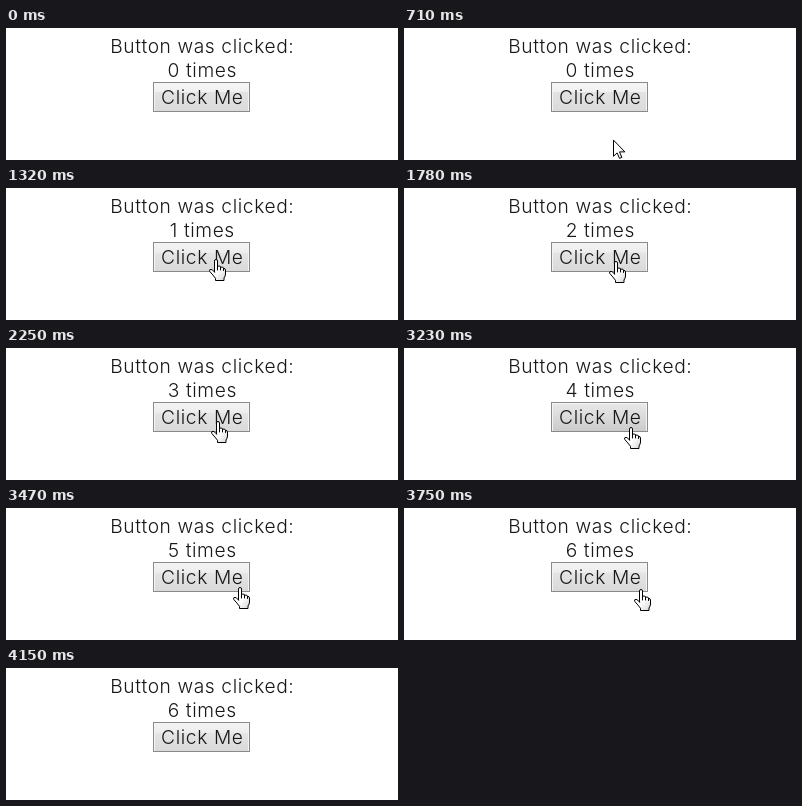
An HTML page that plays this animation: 392x132 px, repeating every 4580 ms.

```html
<!DOCTYPE html>
<html lang="en">
<head>
<meta charset="utf-8">
<title>Click counter</title>
<style>
  html, body { margin: 0; width: 100%; height: 100%; overflow: hidden; background: #fff; }
  svg { display: block; }
  text {
    font: 300 19.2px Inter, "Open Sans", sans-serif;
    letter-spacing: .6px;
    text-anchor: middle;
    fill: #181818;
  }
  .cursor { fill: url(#shade); stroke: #000; stroke-linejoin: round; stroke-linecap: round; }
</style>
</head>
<body>
<svg width="392" height="132" viewBox="0 0 392 132">
  <defs>
    <linearGradient id="normal" x2="0" y2="1">
      <stop offset="0" stop-color="#f6f6f6"/>
      <stop offset=".3" stop-color="#f0f0f0"/>
      <stop offset=".3" stop-color="#e3e3e3"/>
      <stop offset="1" stop-color="#dadada"/>
    </linearGradient>
    <linearGradient id="hover" x2="0" y2="1">
      <stop offset="0" stop-color="#f3f3f3"/>
      <stop offset=".3" stop-color="#ededed"/>
      <stop offset=".35" stop-color="#e4e4e4"/>
      <stop offset="1" stop-color="#d9d9d9"/>
    </linearGradient>
    <linearGradient id="pressed" x2="0" y2="1">
      <stop offset="0" stop-color="#e8e8e8"/>
      <stop offset="1" stop-color="#cbcbcb"/>
    </linearGradient>
    <linearGradient id="shade" x2="1" y2="1">
      <stop offset=".55" stop-color="#fff"/>
      <stop offset="1" stop-color="#d4d4d4"/>
    </linearGradient>
  </defs>
  <text x="196.3" y="25">Button was clicked:</text>
  <text id="count" x="196.3" y="49"></text>
  <rect x="147.5" y="54.5" width="96" height="29" fill="#f4f4f4" stroke="#8a8a8a"/>
  <rect id="face" x="149" y="56" width="93" height="27"/>
  <text x="196.3" y="76">Click Me</text>
  <path id="arrow" class="cursor" d="M.5 .5V16.3L4.1 12.9 6.5 18.4 8.9 17.4 6.5 11.9H11.5Z"/>
  <path id="hand" class="cursor" d="M5.5 13V2Q5.5 .5 7 .5T8.5 2V7.2Q11.5 6.3 11.5 8.2 14.5 7.4 14.5 9.4 16.5 9.2 16.5 11V15Q16.5 17 15 19V21.5H6.5V19.3Q4 16 .8 12.5Q-.2 10.4 2 10.3 3.6 10.4 5.5 13M8.5 7.2V11M11.5 8.2V11M14.5 9.4V11.5"/>
</svg>
<script>
  const LOOP = 4580;
  const byId = id => document.getElementById(id);
  const count = byId("count"), face = byId("face");
  const cursors = { arrow: byId("arrow"), hand: byId("hand") };

  // start time, clicks, button state, cursor, cursor x, cursor y
  const steps = [
    [0, 0, "normal"],
    [710, 0, "normal", "arrow", 209, 112],
    [870, 0, "normal", "arrow", 207, 91],
    [1020, 0, "hover", "hand", 203, 71],
    [1320, 1, "hover", "hand", 203, 71],
    [1630, 1, "hover", "hand", 205, 73],
    [1780, 2, "hover", "hand", 205, 73],
    [2250, 3, "hover", "hand", 205, 73],
    [2380, 3, "hover", "hand", 206, 75],
    [2650, 3, "pressed", "hand", 206, 75],
    [2810, 4, "hover", "hand", 209, 77],
    [2960, 4, "hover", "hand", 212, 78],
    [3090, 4, "hover", "hand", 216, 79],
    [3230, 4, "pressed", "hand", 220, 79],
    [3360, 5, "hover", "hand", 224, 79],
    [3470, 5, "hover", "hand", 227, 79],
    [3600, 5, "pressed", "hand", 227, 79],
    [3750, 6, "hover", "hand", 230, 81],
    [3900, 6, "hover", "arrow", 250, 94],
    [4030, 6, "hover", "arrow", 274, 113],
    [4150, 6, "hover"]
  ];

  function render(time) {
    const [, clicks, state, cursor, x, y] = steps.findLast(step => step[0] <= time);
    count.textContent = `${clicks} times`;
    face.setAttribute("fill", `url(#${state})`);
    for (const [name, shape] of Object.entries(cursors)) {
      const visible = name === cursor;
      shape.setAttribute("visibility", visible ? "visible" : "hidden");
      if (visible) shape.setAttribute("transform", `translate(${x} ${y})`);
    }
  }

  const start = performance.now();
  function tick() {
    render((performance.now() - start) % LOOP);
    requestAnimationFrame(tick);
  }
  tick();
</script>
</body>
</html>
```
